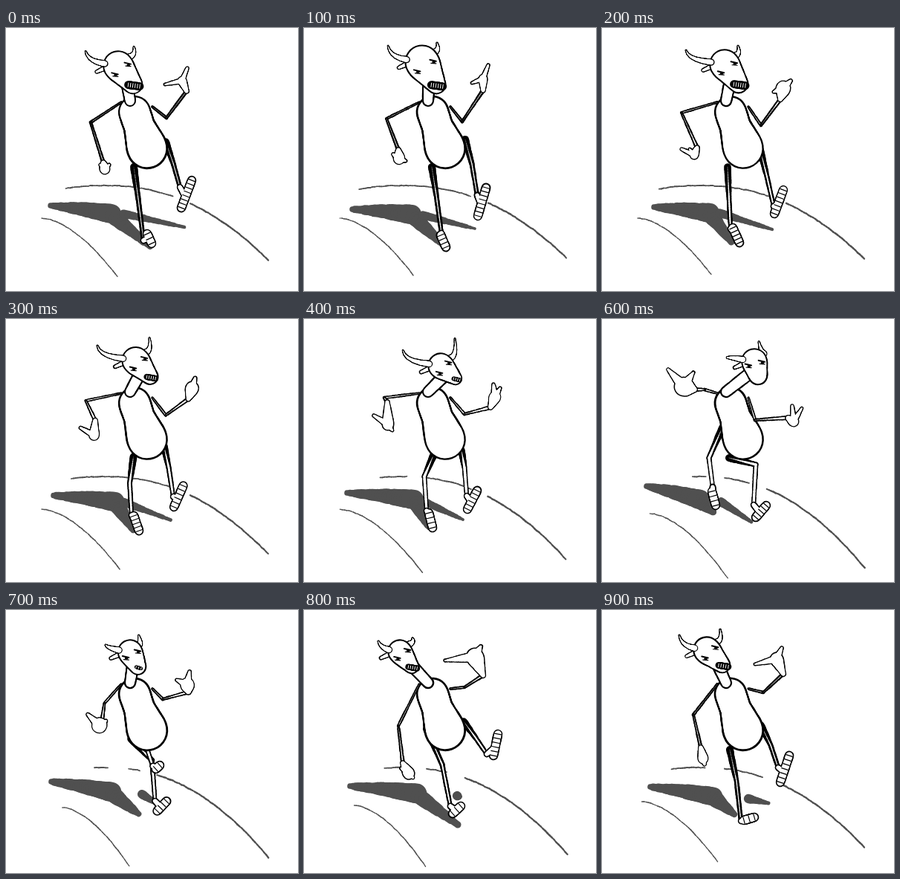
Animation, 393 px wide and 354 px high, one loop 1 s. Source, as an HTML page with a canvas:

```html
<!DOCTYPE html>
<html lang="en">
<head>
<meta charset="utf-8">
<title>Walking bull</title>
<style>
  html, body { margin: 0; width: 100%; height: 100%; overflow: hidden; background: #fff; }
  canvas { display: block; width: 393px; height: 354px; }
</style>
</head>
<body>
<canvas id="stage"></canvas>
<script>
const W = 393, H = 354, STEP = 100, COUNT = 10;
const INK = '#000', PAPER = '#fff', GREY = '#505050';

// Fixed body: points are [x, y, radius]
const TORSO = [[173, 113, 21], [180, 134, 20.5], [190, 162, 27]];
const NECK = [167, 98, 7];
const SHOULDERS = [[155, 100], [197, 106]];

// Joints of the walk by step.
// head: crown, muzzle; arms: elbow, wrist, palm, two fingertips;
// legs: hip, knee, ankle, heel, toe; shadow: tail, hip, standing foot, swinging leg from, to
const POSES = {
  0: {
    head: [[151, 51, 20], [171, 76, 12]], horns: [[107, 31], [172, 25]], nose: 1,
    arms: [[[114, 127], [131, 181], [133, 190, 7], [127, 184], [139, 184]],
           [[216, 121], [243, 85], [237, 71, 6], [244, 54], [214, 76]]],
    legs: [[[172, 187], [178, 230], [185, 286], [190, 277], [196, 290]],
           [[215, 153], [225, 182], [234, 214], [236, 242], [250, 205]]],
    shadow: [[60, 239], [142, 250], [194, 294], [158, 250], [240, 268]]
  },
  1: {
    head: [[159, 46, 23], [178, 76, 12]], horns: [[113, 24], [179, 20]], nose: 1,
    arms: [[[111, 122], [127, 164], [128, 176, 8], [120, 170], [137, 179]],
           [[213, 126], [241, 84], [241, 68, 6], [248, 50], [226, 74]]],
    legs: [[[172, 187], [178, 225], [185, 276], [184, 279], [191, 295]],
           [[217, 150], [226, 183], [233, 225], [234, 253], [245, 215]]],
    shadow: [[65, 244], [145, 251], [190, 294], [160, 252], [230, 270]]
  },
  2: {
    head: [[165, 49, 20], [184, 75, 12]], horns: [[113, 30], [183, 24]], nose: 1,
    arms: [[[107, 114], [128, 161], [124, 171, 6], [107, 163], [118, 163]],
           [[214, 131], [240, 96], [244, 81, 10], [254, 71], [231, 86]]],
    legs: [[[169, 187], [171, 230], [173, 270], [176, 269], [185, 289]],
           [[213, 164], [222, 200], [231, 240], [232, 250], [244, 218]]],
    shadow: [[70, 241], [145, 249], [174, 288], [158, 249], [229, 271]]
  },
  4: {
    head: [[184, 63, 17], [204, 80, 8]], horns: [[133, 42], [203, 26]], nose: .8,
    arms: [[[108, 106], [112, 112], [113, 142, 8], [94, 130], [119, 150]],
           [[216, 128], [251, 119], [257, 105, 8], [255, 88], [264, 93]]],
    legs: [[[174, 184], [162, 212], [165, 258], [168, 261], [173, 281]],
           [[212, 177], [216, 200], [219, 238], [220, 256], [233, 231]]],
    shadow: [[58, 234], [148, 243], [168, 280], [158, 244], [214, 270]]
  },
  6: {
    head: [[205, 57, 17], [210, 76, 12]], horns: [[168, 52], [211, 30]], nose: 0, swap: true,
    arms: [[[138, 95], [125, 95], [110, 91, 13], [89, 68], [123, 72]],
           [[206, 136], [250, 133], [258, 138, 7], [256, 117], [269, 120]]],
    legs: [[[162, 146], [144, 187], [149, 226], [148, 232], [153, 251]],
           [[171, 187], [207, 196], [204, 250], [207, 267], [221, 251]]],
    shadow: [[60, 225], [132, 243], [150, 260], [160, 246], [201, 273]]
  },
  8: {
    head: [[129, 56, 16], [145, 76, 9]], horns: [[100, 42], [146, 38]], nose: 1,
    arms: [[[127, 156], [133, 206], [141, 220, 8], [131, 213], [147, 226]],
           [[216, 104], [241, 88], [230, 63, 12], [238, 49], [190, 68]]],
    legs: [[[165, 160], [186, 208], [197, 264], [200, 274], [211, 264]],
           [[215, 150], [231, 172], [246, 194], [255, 196], [261, 167]]],
    shadow: [[62, 237], [152, 247], [207, 289], [206, 250], [210, 252]]
  },
  9: {
    head: [[141, 54, 18], [162, 74, 10]], horns: [[104, 34], [159, 26]], nose: 1,
    arms: [[[123, 141], [133, 185], [136, 200, 7], [138, 208], [132, 191]],
           [[217, 111], [244, 86], [235, 66, 9], [242, 51], [206, 73]]],
    legs: [[[172, 188], [181, 230], [187, 284], [191, 283], [205, 279]],
           [[214, 155], [227, 182], [237, 212], [240, 232], [252, 196]]],
    shadow: [[65, 238], [150, 251], [178, 275], [197, 254], [224, 260]]
  }
};

function mix(a, b, t) {
  if (typeof a === 'number') return a + (b - a) * t;
  if (Array.isArray(a)) return a.map((v, i) => mix(v, b[i], t));
  if (typeof a !== 'object') return a;
  return Object.fromEntries(Object.keys(b).map(k => [k, mix(a[k], b[k], t)]));
}

function poseAt(step) {
  if (POSES[step]) return POSES[step];
  const a = POSES[step - 1], b = POSES[step + 1];
  // After the turn the planted leg becomes the standing one.
  return mix(a.swap ? { ...a, legs: [a.legs[1], a.legs[0]] } : a, b, .5);
}

const canvas = document.getElementById('stage'), ctx = canvas.getContext('2d');
const ratio = window.devicePixelRatio || 1;
canvas.width = W * ratio;
canvas.height = H * ratio;
ctx.scale(ratio, ratio);
ctx.lineCap = ctx.lineJoin = 'round';

let seed = 1;
function noise(size) {
  seed = seed * 16807 % 2147483647;
  return (seed / 2147483647 - .5) * size;
}

const sized = (p, r) => [p[0], p[1], r];
const shift = (p, x, y) => [p[0] + x, p[1] + y];

function line(a, b, width, color = INK) {
  ctx.strokeStyle = color;
  ctx.lineWidth = Math.max(.1, width);
  ctx.beginPath();
  ctx.moveTo(a[0], a[1]);
  ctx.lineTo(b[0], b[1]);
  ctx.stroke();
}

// Tapered stroke through [x, y, radius] points
function tube(pts, color, grow = 0, rough = .5) {
  const n = 12;
  for (let i = 1; i < pts.length; i++)
    for (let k = 0; k < n; k++) {
      const a = mix(pts[i - 1], pts[i], k / n), b = mix(pts[i - 1], pts[i], (k + 1) / n);
      line(a, b, a[2] + b[2] + 2 * grow + noise(rough), color);
    }
}

// Joined tubes with one common outline
function outlined(tubes, weight) {
  tubes.forEach(t => tube(t, INK, weight / 2, .9));
  tubes.forEach(t => tube(t, PAPER, -weight / 2, .6));
}

// Inked limb with a pale core
function limb(pts, hollow) {
  tube(pts, INK, 0, .9);
  const core = pts.map((p, i) => sized(p, i ? p[2] * hollow : .1));
  tube(core, PAPER, 0, .3);
}

function hatch(a, b, half, gap, color = INK, width = 1.2) {
  const dx = b[0] - a[0], dy = b[1] - a[1], len = Math.hypot(dx, dy) || 1;
  const nx = -dy / len * half, ny = dx / len * half, n = Math.max(1, Math.round(len / gap));
  for (let i = 0; i <= n; i++) {
    const p = mix(a, b, i / n);
    line(shift(p, -nx, -ny), shift(p, nx, ny), width, color);
  }
}

function curve(x0, x1, y, width) {
  let last = [x0, y(x0)];
  for (let x = x0 + 3; x <= x1; x += 3) {
    const next = [x, y(x) + noise(.9)];
    line(last, next, width + noise(.5), GREY);
    last = next;
  }
}

// The path swings slowly while the walker stays in place.
function ground(step) {
  const sway = Math.cos((step - 1.2) * Math.PI / 5);
  const bump = Math.exp(-(((step - 7.1) / 1.5) ** 2));
  const drop = 112 - 13 * sway;
  const hill = x => 212 + drop * Math.abs((x - 132) / 223) ** 2.2;
  const gap = 237 - 45 * bump, start = 98 - 24 * sway;
  if (step < 4) curve(start, gap - 11, hill, 1.8);
  else {
    curve(start, 140, hill, 1.8);
    curve(165, gap - 11, hill, 1.8);
  }
  curve(gap + 11, 355, hill, 2.2);

  const x0 = 48 + 28 * bump, y0 = 256 + 10 * bump, x1 = 159 - 11 * sway, y1 = 342 - 8 * sway;
  curve(x0, x1, x => y0 + (y1 - y0) * ((x - x0) / (x1 - x0)) ** 1.7, 1.4);
}

function shadow([tail, hip, stand, from, to]) {
  const mid = shift(mix(tail, hip, .5), 0, -1);
  tube([sized(tail, 4), sized(mid, 9), sized(hip, 13)], GREY, 0, 2);
  tube([sized(shift(hip, 2, 3), 11), sized(stand, 4)], GREY, 0, 2);
  tube([sized(from, 6), sized(to, 2)], GREY, 0, 1.5);
}

function leg([hip, knee, ankle, heel, toe], hollow) {
  limb([sized(hip, 5), sized(knee, 3.4), sized(ankle, 3)], hollow);
  outlined([[sized(ankle, 3.5), sized(mix(heel, toe, .4), 4)], [sized(heel, 5.5), sized(toe, 5.5)]], 1.7);
  hatch(heel, toe, 4.5, 6);
}

function arm(shoulder, [elbow, wrist, palm, tipA, tipB], hollow) {
  limb([sized(shoulder, 1.8), sized(elbow, 2.2)], hollow * .6);
  limb([sized(elbow, 2), sized(wrist, 2.8)], hollow);
  const base = sized(palm, palm[2] * .6);
  outlined([[sized(wrist, 3), palm], [base, sized(tipA, 2)], [base, sized(tipB, 1.6)]], 1.4);
}

function horn(base, tip) {
  const bend = shift([tip[0], base[1]], 3, -3), pts = [];
  for (let t = 0; t <= 1.01; t += .2)
    pts.push(sized(mix(mix(base, bend, t), mix(bend, tip, t), t), 4 - 3.3 * t));
  outlined([pts], 1.3);
}

function face([crown, muzzle], nose) {
  const dx = muzzle[0] - crown[0], dy = muzzle[1] - crown[1], len = Math.hypot(dx, dy);
  const ux = dx / len, uy = dy / len, r = crown[2];
  const mid = mix(crown, muzzle, .22);
  [-.55, .55].forEach(side => {
    const eye = shift(mid, uy * r * side, -ux * r * side);
    line(shift(eye, -4.5, -3), shift(eye, 4, -1), 2);
    line(shift(eye, -3, 1.5), shift(eye, 4, 2), 1.2);
    line(eye, shift(eye, 1.5, 0), 3);
  });
  const size = muzzle[2] * nose;
  if (!size) return;
  const lip = shift(muzzle, ux * 2, uy * 2);
  const left = shift(lip, -size * .65, -1), right = shift(lip, size * .65, 1);
  tube([sized(left, size * .45), sized(right, size * .45)], INK);
  hatch(left, right, size * .22, 3, PAPER, 1);
}

function head(pose) {
  const [crown, muzzle] = pose.head, r = crown[2];
  const left = shift(crown, -r * .9, -r * .15), right = shift(crown, r * .75, -r * .6);
  outlined([[sized(mix(crown, muzzle, .5), 8), NECK]], 2.2);
  horn(right, pose.horns[1]);
  outlined([[sized(shift(left, 0, 6), 3), sized(shift(left, -11, 11), 2)]], 1.4);
  outlined([pose.head], 2);
  horn(left, pose.horns[0]);
  face(pose.head, pose.nose);
}

function draw(step) {
  const pose = poseAt(step);
  const hollow = .35 - .2 * Math.cos(step * Math.PI / 5);
  seed = 4001 + step * 977;
  ctx.fillStyle = PAPER;
  ctx.fillRect(0, 0, W, H);
  shadow(pose.shadow);
  ground(step);
  pose.legs.forEach(l => leg(l, hollow));
  outlined([TORSO], 2.6);
  SHOULDERS.forEach((s, i) => arm(s, pose.arms[i], hollow));
  head(pose);
}

let shown = -1;
function tick() {
  const step = Math.floor(performance.now() / STEP) % COUNT;
  if (step !== shown) draw(shown = step);
  requestAnimationFrame(tick);
}
tick();
</script>
</body>
</html>
```
